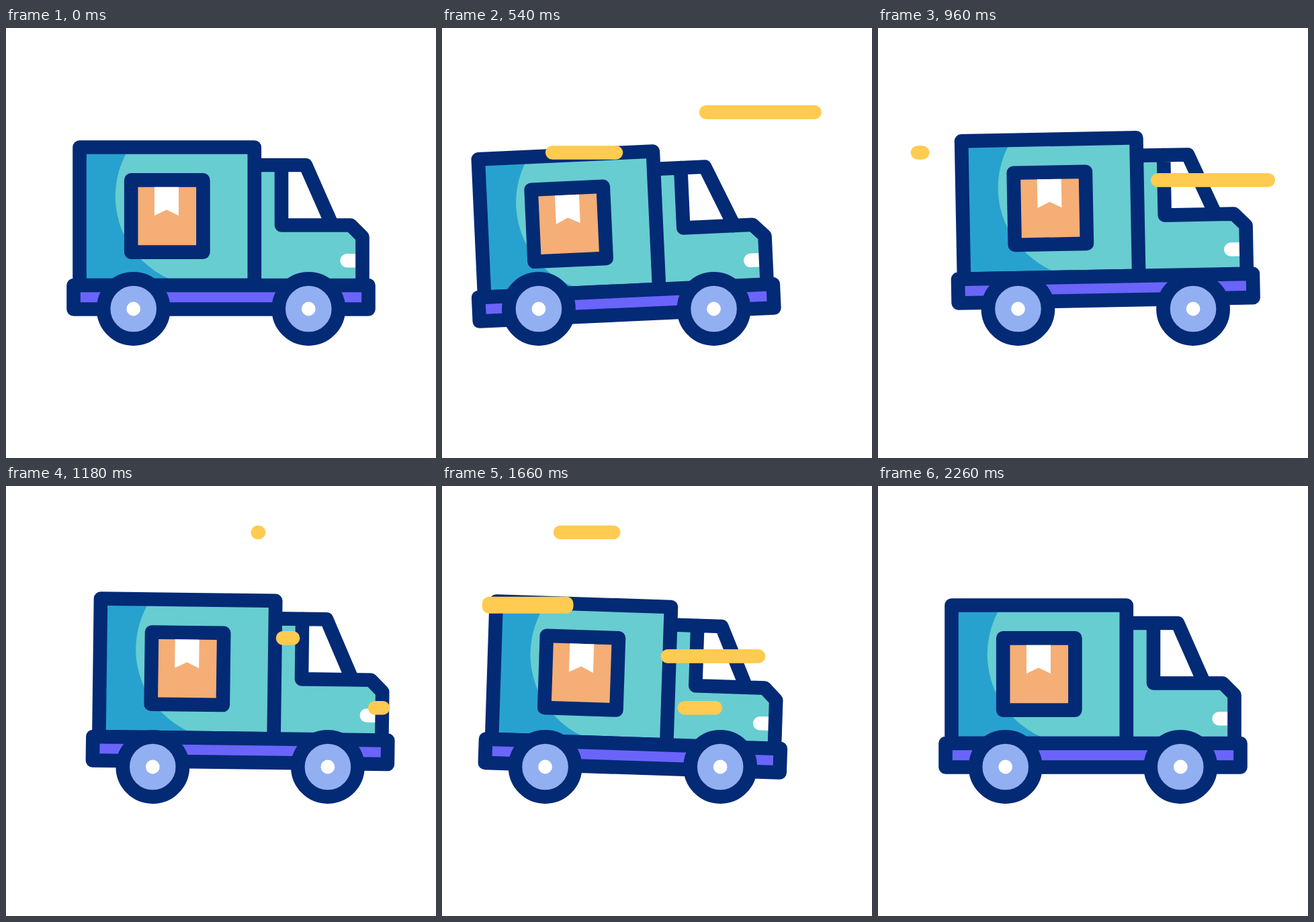
An HTML page that plays this animation: 640x640 px, repeating every 2.4 s.

```html
<!DOCTYPE html>
<html lang="en">
<head>
<meta charset="utf-8">
<title>Delivery truck</title>
<style>
  html, body { margin: 0; width: 100%; height: 100%; overflow: hidden; background: #fff; }
  svg { display: block; width: 100vw; height: 100vh; }
  .ink { stroke: #032a75; stroke-width: 20.6; stroke-linecap: round; stroke-linejoin: round; }
</style>
</head>
<body>
<svg viewBox="0 0 640 640">
  <defs>
    <clipPath id="cargo"><rect x="109.5" y="177.5" width="260.5" height="205.5"/></clipPath>
  </defs>
  <g id="body">
    <!-- cab -->
    <path fill="#67cdd1" d="M370 204H410V293.5H513L530.5 311V383H370Z"/>
    <path fill="#fff" d="M410 204H446L486 293.5H410Z"/>
    <rect x="497.3" y="336" width="33" height="20.6" rx="10.3" fill="#fff"/>
    <path class="ink" fill="none" d="M370 204H446L485.5 293.5M410 204V293.5H513L530.5 311V383"/>
    <!-- cargo box -->
    <g clip-path="url(#cargo)">
      <rect x="100" y="170" width="280" height="220" fill="#27a2ce"/>
      <circle cx="297.2" cy="250.5" r="134.5" fill="#67cdd1"/>
      <rect x="297" y="170" width="80" height="220" fill="#67cdd1"/>
    </g>
    <rect class="ink" fill="none" x="109.5" y="177.5" width="260.3" height="205.5"/>
    <!-- parcel -->
    <rect class="ink" fill="#f5ae76" x="186.2" y="226.4" width="107.2" height="107.2"/>
    <path fill="#fff" d="M221 236.7H257V279.3L239 270.4L221 279.3Z"/>
    <!-- chassis -->
    <rect class="ink" fill="#6b64fa" x="100.5" y="383" width="439" height="35.5"/>
  </g>
  <g id="wheels">
    <g id="wheel">
      <circle class="ink" cx="189.7" cy="418" r="44.6" fill="#92aff1"/>
      <circle cx="189.7" cy="418" r="10.4" fill="#fff"/>
    </g>
    <use href="#wheel" x="260.6"/>
  </g>
  <g id="wind" fill="#ffcb50"></g>
</svg>
<script>
  const LOOP = 2400, RUN = 200, CAP = 10.3;
  const get = id => document.getElementById(id);
  const body = get('body'), wheels = get('wheels'), wind = get('wind');

  // [time, value] keys, eased in and out between neighbours
  const shift = [[18, 0], [567, -46], [1107, 32], [1625, -36.5], [2170, 0]];
  const bounce = [[0, 0], [430, 10], [1030, -14], [1440, 8.6], [1890, -7.6], [2260, 0]];
  const tilt = [[0, 0], [610, -2.7], [1500, 2.1], [2265, 0]];

  // start time, right end, height of the centre line, thickness
  const streaks = [
    [240, 556, 125.4, 20.6],
    [338, 259, 185.5, 20.6],
    [580, 612, 226.4, 20.6],
    [1115, 561, 330.3, 20.6],
    [1160, 376, 69, 20.6],
    [1205, 270, 177.3, 25],
    [1403, 471, 253.4, 20.6]
  ].map(([start, x, y, h]) => {
    const el = document.createElementNS('http://www.w3.org/2000/svg', 'rect');
    el.setAttribute('y', y - h / 2);
    el.setAttribute('height', h);
    el.setAttribute('rx', CAP);
    wind.appendChild(el);
    return { el, start, x };
  });

  function ease(u) {
    u = Math.min(1, Math.max(0, u));
    return (1 - Math.cos(Math.PI * u)) / 2;
  }

  function track(keys, t) {
    let v = keys[0][1];
    for (let i = 1; i < keys.length; i++) {
      const [t0, v0] = keys[i - 1], [t1, v1] = keys[i];
      v += (v1 - v0) * ease((t - t0) / (t1 - t0));
    }
    return v;
  }

  function draw(t) {
    const dx = track(shift, t);
    body.setAttribute('transform',
      `translate(${dx} ${track(bounce, t)}) rotate(${track(tilt, t)} 320 400)`);
    wheels.setAttribute('transform', `translate(${dx} 0)`);
    for (const { el, start, x } of streaks) {
      const age = t - start;
      const head = RUN * ease(age / 420);
      const tail = RUN * ease((age - 280) / 390);
      const shown = head - tail > 0.1;
      el.setAttribute('visibility', shown ? 'visible' : 'hidden');
      el.setAttribute('x', x - head - CAP);
      el.setAttribute('width', Math.max(0, head - tail) + 2 * CAP);
    }
  }

  const begin = performance.now();
  function tick() {
    draw((performance.now() - begin) % LOOP);
    requestAnimationFrame(tick);
  }
  draw(0);
  requestAnimationFrame(tick);
</script>
</body>
</html>
```
